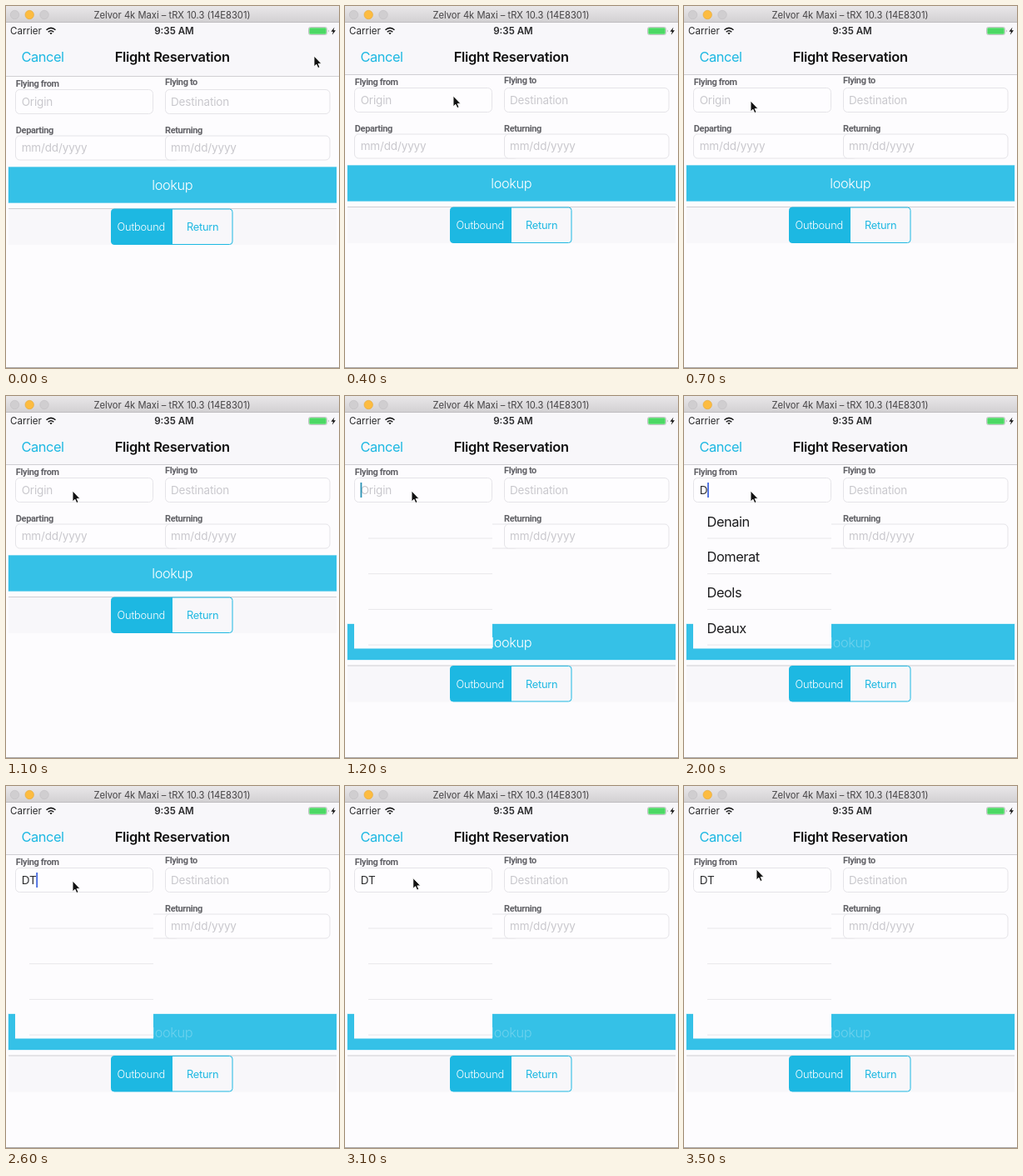
Animation of 400x435 px, one loop 3.6 s. Source, as an HTML page:

```html
<!DOCTYPE html>
<html lang="en">
<head>
<meta charset="utf-8">
<title>Flight Reservation</title>
<style>
  html, body { margin: 0; width: 100%; height: 100%; overflow: hidden; background: #fdfcfe; }
  svg { display: block; font-family: Inter, "Liberation Sans", sans-serif; }
  text { white-space: pre; }
  .mid { text-anchor: middle; }
  .bar { fill: #f8f7fa; }
  .line { stroke: #d0cfd3; }
  .field { fill: #fefdff; stroke: #e5e4e8; }
  .label { font: bold 11px Roboto, "Liberation Sans", sans-serif; letter-spacing: -.38px; fill: #626267; }
  .entry { font-size: 13.5px; letter-spacing: -.15px; fill: #c9c8cd; }
  .big { font-size: 16.4px; letter-spacing: -.45px; }
  .status { font-size: 11.6px; fill: #2a2a2c; }
  .seg { font-size: 12.8px; letter-spacing: -.22px; }
</style>
</head>
<body>
<svg width="400" height="435" viewBox="0 0 400 435">
  <defs>
    <linearGradient id="chrome" x2="0" y2="1">
      <stop stop-color="#e9e7e9"/><stop offset="1" stop-color="#d2d0d2"/>
    </linearGradient>
  </defs>

  <g id="page">
    <text class="label" x="11.8" y="95">Flying from</text>
    <text class="label" x="191" y="93">Flying to</text>
    <rect class="field" x="11.5" y="98.5" width="165" height="29" rx="5"/>
    <rect class="field" x="191.5" y="98.5" width="197.5" height="29" rx="5"/>
    <text class="entry" id="origin" x="18.7" y="118">Origin</text>
    <text class="entry" x="198" y="118">Destination</text>

    <text class="label" x="11.8" y="151">Departing</text>
    <text class="label" x="191" y="151">Returning</text>
    <rect class="field" x="11.5" y="154" width="197" height="29" rx="5"/>
    <rect class="field" x="191.5" y="154" width="197.5" height="29" rx="5"/>
    <text class="entry" x="18.7" y="173">mm/dd/yyyy</text>
    <text class="entry" x="198" y="173">mm/dd/yyyy</text>

    <g id="lower">
      <rect x="3" y="191.5" width="394" height="43" fill="#35c1e7" stroke="#35c1e7" stroke-opacity=".3"/>
      <text id="lookup" class="big mid" x="199.7" y="219" fill="#fff" font-weight="300">lookup</text>
      <rect class="bar" x="3" y="241" width="394" height="44"/>
      <path class="line" d="M3 241.5H397"/>
      <rect x="126.5" y="242" width="145.5" height="42.5" rx="3.5" fill="none" stroke="#1db8e2"/>
      <path d="M200 242H130a3.5 3.5 0 0 0-3.5 3.5V281a3.5 3.5 0 0 0 3.5 3.5H200z" fill="#1db8e2"/>
      <text class="seg mid" x="162.3" y="268.3" fill="#fff" font-weight="300">Outbound</text>
      <text class="seg mid" x="236.2" y="268.3" fill="#1db8e2">Return</text>
    </g>

    <g id="menu">
      <rect x="11" y="128" width="166" height="175.5" fill="#fdfcfe"/>
      <path d="M28 171H177M28 213.7H177M28 256.4H177M28 299.1H177" stroke="#e8e7ea"/>
      <g id="towns" class="big" fill="#1c1c1e">
        <text x="27.5" y="156.5">Denain</text>
        <text x="27.5" y="199.2">Domerat</text>
        <text x="27.5" y="241.9">Deols</text>
        <text x="27.5" y="284.6">Deaux</text>
      </g>
    </g>
    <rect id="caret" y="104" width="1.8" height="18"/>
    <rect class="bar" y="60" width="400" height="22"/>
    <path class="line" d="M0 82.5H400"/>
  </g>

  <rect class="bar" y="20" width="400" height="60"/>
  <rect width="400" height="20" fill="url(#chrome)"/>
  <path d="M0 19.5H400" stroke="#bfbdbf"/>
  <g fill="#d0ced0" stroke="#c3c1c3" stroke-width=".7">
    <circle cx="10.5" cy="10.5" r="5.2"/>
    <circle cx="28.2" cy="10.5" r="5.2" fill="#fdbc40" stroke="#e5ab3c"/>
    <circle cx="46" cy="10.5" r="5.2"/>
  </g>
  <text class="mid" x="199.5" y="14.5" font-size="11.2" fill="#454345">Zelvor 4k Maxi – tRX 10.3 (14E8301)</text>

  <text class="status" x="5" y="34">Carrier</text>
  <g fill="none" stroke="#111" stroke-width="1.5">
    <path d="M48.5 28.8q5.5-4.8 11 0M50.7 31.2q3.3-2.8 6.6 0"/>
    <path d="M52.3 32.5L54 34.3L55.7 32.5Q54 31.3 52.3 32.5z" fill="#111" stroke="none"/>
  </g>
  <text class="status mid" x="202" y="34" font-weight="600">9:35 AM</text>
  <rect x="363.5" y="25.5" width="22" height="9" rx="2" fill="#fff" stroke="#b4b4b8" stroke-width=".8"/>
  <rect x="364.3" y="26.3" width="20.4" height="7.4" rx="1.2" fill="#4cd964"/>
  <path d="M387 28.3q1.5 1.7 0 3.4z" fill="#9c9ca0"/>
  <path d="M394.5 25.5L390.5 30.7H393L391.8 34.8L396 29.3H393.4z" fill="#111"/>

  <text class="big" x="18.5" y="67.2" fill="#1db8e2">Cancel</text>
  <text class="mid" x="199.7" y="67.2" font-size="16.4" font-weight="600" letter-spacing="-.28" fill="#111">Flight Reservation</text>
  <path d="M0 434.5H400" stroke="#a9a7a9"/>

  <path id="cursor" d="M0 0V12.8L2.9 10.2L4.8 14.6L7 13.6L5.1 9.4H9z" fill="#111" stroke="#fff" stroke-width=".9"/>
</svg>

<script>
const LOOP = 3600, STEP = 100;
const $ = id => document.getElementById(id);
const origin = $('origin'), caret = $('caret');

// time, x, y of the pointer tip
const path = [
  [0, 370, 60], [100, 332, 66], [200, 250, 85], [300, 178, 100], [400, 130, 108],
  [500, 98, 113], [600, 80, 114], [3000, 80, 114], [3400, 87, 100], [LOOP, 87, 100]
];

function pointer(t) {
  const i = path.findIndex(p => p[0] > t);
  const [t0, x0, y0] = path[i - 1], [t1, x1, y1] = path[i];
  const k = (t - t0) / (t1 - t0);
  return [x0 + (x1 - x0) * k, y0 + (y1 - y0) * k];
}

const shift = (id, x, y) => $(id).setAttribute('transform', `translate(${x} ${y})`);
const show = (id, on) => { $(id).style.display = on ? '' : 'none'; };

function draw(t) {
  const open = t >= 1200;
  const typed = t < 1700 ? '' : t < 2400 ? 'D' : 'DT';

  shift('cursor', ...pointer(t));
  shift('page', 0, 2 * Math.max(0, 1 - t / 300));
  shift('lower', 0, open ? 82.5 : 0);
  $('lookup').setAttribute('fill-opacity', t < 1300 ? 1 : .27);

  show('menu', open);
  show('towns', t >= 1900 && t < 2500);

  origin.textContent = typed || 'Origin';
  origin.style.fill = typed ? '#2c2c2e' : '';
  caret.setAttribute('x', 18.5 + (typed ? origin.getComputedTextLength() : 0));
  caret.setAttribute('fill', typed ? '#4468e0' : '#2a93b5');
  show('caret', open && t < 3100);
}

const start = performance.now();
function tick() {
  const t = (performance.now() - start) % LOOP;
  draw(Math.floor(t / STEP) * STEP);
  requestAnimationFrame(tick);
}
tick();
</script>
</body>
</html>
```
